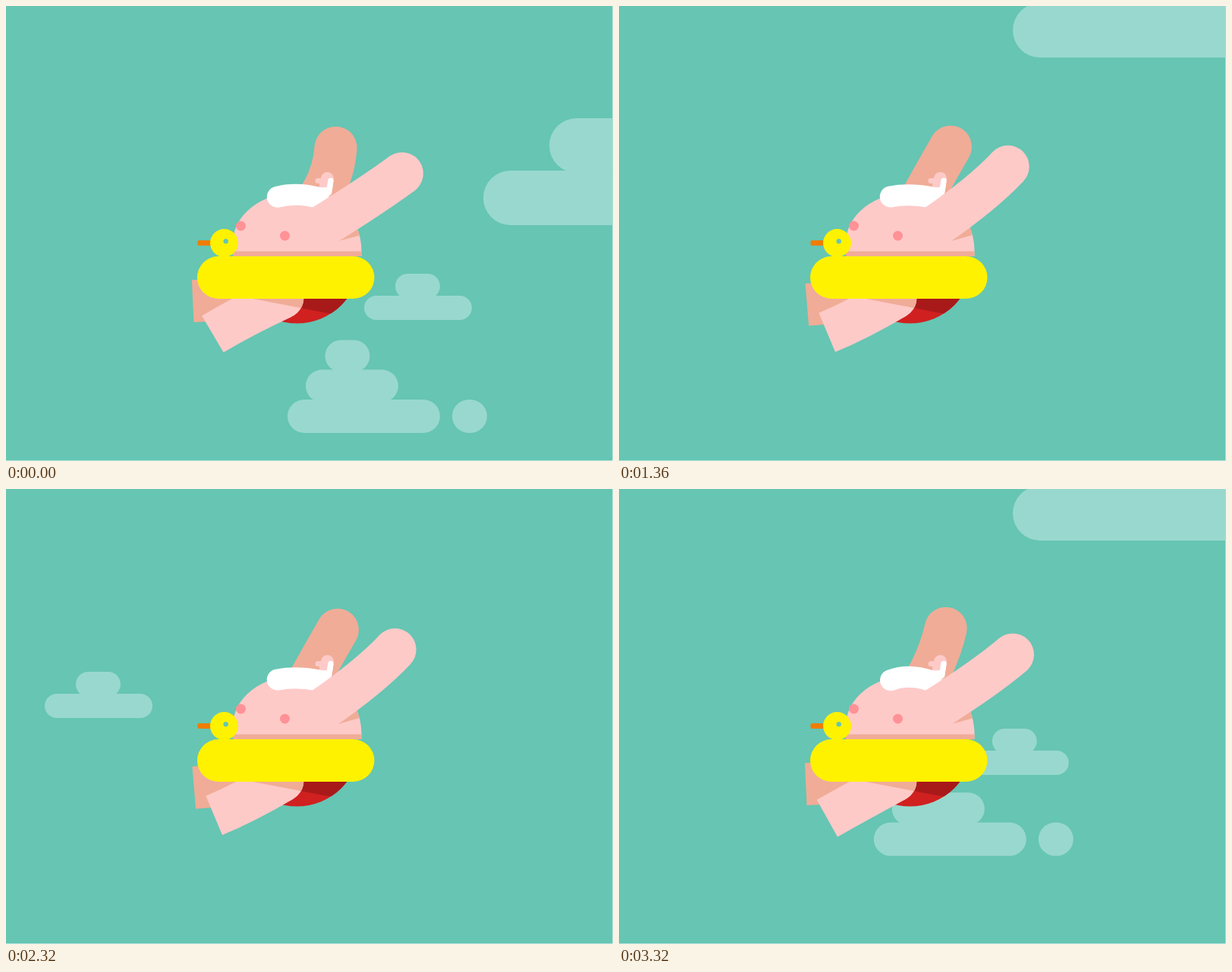
An HTML page with a canvas for the animation above (3360 ms loop, 800 px wide and 600 px high).

```html
<!DOCTYPE html>
<html lang="en">
<head>
<meta charset="utf-8">
<title>Flying swimmer</title>
<style>
  html, body { margin: 0; width: 100%; height: 100%; overflow: hidden; background: #fff; }
  canvas { display: block; }
</style>
</head>
<body>
<canvas id="stage" width="800" height="600"></canvas>
<script>
const ctx = document.getElementById('stage').getContext('2d');
const STEP = 40, LOOP = 84, CYCLE = 12, TURN = 2 * Math.PI;
const SKY = '#66c5b3', MIST = '#99d8ce', SKIN = '#fdcac8', SHADE = '#f0ac97',
      RED = '#d02020', DARK_RED = '#a81a1a', YELLOW = '#fff200', PINK = '#ff9296';

// Cloud kinds: speed per step, and pills as x, y, width, height
const SMALL = { vx: 21.2, vy: 37, pills: [[0, 0, 142, 32], [41, -29, 59, 33]] };
const DOTTED = { vx: 35.2, vy: 79.2,
  pills: [[0, 0, 201, 44], [24, -39.5, 122, 43], [49.5, -78.5, 59, 42], [217, 0, 46, 44]] };
const STACK = { vx: 52, vy: 106, pills: [[0, 0, 232, 50], [45, -48, 142, 50], [61, 48, 142, 48]] };
const BIG = { vx: 110, vy: 221, pills: [[0, 0, 317, 72], [87, -69, 131, 72]] };

function pill(x, y, w, h, color, r = Math.min(w, h) / 2) {
  ctx.fillStyle = color;
  ctx.beginPath();
  ctx.roundRect(x, y, w, h, r);
  ctx.fill();
}

function disc(x, y, r, color) {
  ctx.fillStyle = color;
  ctx.beginPath();
  ctx.arc(x, y, r, 0, TURN);
  ctx.fill();
}

function poly(points, color) {
  ctx.fillStyle = color;
  ctx.beginPath();
  points.forEach(p => ctx.lineTo(...p));
  ctx.fill();
}

function curve(x, y, [ex, ey, bx, by], width, color, cap = 'butt') {
  ctx.strokeStyle = color;
  ctx.lineWidth = width;
  ctx.lineCap = cap;
  ctx.beginPath();
  ctx.moveTo(x, y);
  ctx.quadraticCurveTo(bx, by, ex, ey);
  ctx.stroke();
}

function inside(path, paint) {
  ctx.save();
  ctx.clip(path);
  paint();
  ctx.restore();
}

// Periodic swing: a main beat and an optional second one at double speed
function swing(a, mean, cos, sin, cos2 = 0, sin2 = 0) {
  return mean + cos * Math.cos(a) + sin * Math.sin(a)
    + cos2 * Math.cos(2 * a) + sin2 * Math.sin(2 * a);
}

// Poses: end x, end y, bend x, bend y
const armPose = a => [
  swing(a, 497.3, 24.7, -7.5, 0, 4), swing(a, 201.6, 17, -5.3, 2.3, 2),
  swing(a, 469.5, 7, -14.2, 5.9, 3.8), swing(a, 244.6, 1.4, -7.4, 4, 2.4)
];
const legPose = a => [
  swing(a, 266.7, 5.7, -5.4), swing(a, 414.5, 18.1, -8),
  swing(a, 313.6, 1.2, -1.8), swing(a, 404.8, 2.7, -8.1)
];

// The cloud's main pill is at x, y when step equals start
function cloud(step, kind, start, x, y, scale = 1) {
  const d = (step - start + LOOP * 1.5) % LOOP - LOOP / 2, travel = d * scale ** 1.5;
  for (const [px, py, w, h] of kind.pills)
    pill(x + kind.vx * travel + px * scale, y + kind.vy * travel + py * scale,
         w * scale, h * scale, MIST);
}

function clouds(step) {
  cloud(step, SMALL, 0, 472, 382);
  cloud(step, SMALL, 14, 157, 419);
  cloud(step, SMALL, 58, 51, 270);
  cloud(step, DOTTED, 0, 371, 519);
  cloud(step, DOTTED, 14, 135, -39.5, 0.93);
  cloud(step, STACK, 24, 322, 460);
  cloud(step, STACK, 69, 504, 294, 0.835);
  for (const start of [0, 35, 49, 63]) cloud(step, BIG, start, 629, 217);
}

function arm(pose, dx, color) {
  ctx.save();
  ctx.translate(dx, 0);
  curve(415.5, 291.5, pose, 56, color);
  disc(pose[0], pose[1], 28, color);
  ctx.restore();
}

function backLeg(a) {
  const drop = 13 - 13 * Math.cos(a + TURN / 24) - 1.5 * Math.cos(2 * a + TURN / 12);
  ctx.save();
  ctx.translate(246.5 + 0.34 * drop, 390 + drop);
  ctx.rotate(-(3 + 0.46 * drop) * TURN / 360);
  ctx.fillStyle = SHADE;
  ctx.fillRect(0, -28, 110, 56);
  ctx.restore();
}

function head() {
  disc(423.5, 227.5, 8.5, SKIN);
  pill(407.5, 227, 14, 7, SKIN);
  poly([[413, 230], [430, 230], [430, 242], [413, 242]], SKIN);
}

function body(reach) {
  const hips = new Path2D(), torso = new Path2D();
  hips.arc(383.5, 335.5, 83, 0, TURN / 2);
  torso.moveTo(299, 330);
  torso.ellipse(384, 312, 85, 66, 0, TURN / 2, TURN * 3 / 4);
  torso.arc(384, 323, 84.5, -TURN / 4, 0);
  torso.lineTo(468.5, 330);

  ctx.fillStyle = RED;
  ctx.fill(hips);
  inside(hips, () => poly([[325, 386], [432, 406.4], [470, 386]], DARK_RED));

  ctx.fillStyle = SKIN;
  ctx.fill(torso);
  inside(torso, () => {
    poly([[290, 323.5], [480, 323.5], [480, 332], [290, 332]], SHADE);
    const lift = (523 - reach) / 11.4;
    poly([[434, 311], [470, 301.5 - lift], [470, 265], [425, 290]], SHADE);
  });
  disc(309.5, 290, 6.5, PINK);
  disc(367.5, 303, 6.5, PINK);
}

function beard(a) {
  const sag = swing(a, 0.42, 0, 0, -0.28, 0.36);
  const left = 252 - 2 * sag, right = 253 - 3 * sag, middle = 248 + 5.3 * sag;
  curve(358 - sag, left, [411, right, 382, 2 * middle - (left + right) / 2], 28, '#fff', 'round');
  poly([[405, 240], [423, 239], [431, 235], [429, 248], [403, 265]], '#fff');
  curve(428, 230.5, [425.5, 244, 427, 238], 7.5, '#fff', 'round');
}

function frontLeg(pose) {
  disc(364.5, 384.5, 28, SKIN);
  curve(364.5, 384.5, pose, 56, SKIN);
  poly([[325, 386], [389, 398.2], [391.5, 392], [392.5, 384]], SHADE);
}

function duckRing() {
  pill(252, 330, 233.5, 56, YELLOW);
  pill(252.5, 309, 22, 7, '#ef7d00', 2);
  disc(287.5, 312.5, 18.5, YELLOW);
  disc(289.7, 310.3, 3.2, SKY);
}

function draw(now) {
  // Motion advances at 25 poses per second
  const step = Math.floor(now / STEP) % LOOP, a = step / CYCLE * TURN;
  const pose = armPose(a);
  ctx.clearRect(0, 0, 800, 600);
  ctx.save();
  ctx.beginPath();
  ctx.rect(0, 0, 799.5, 599.5);
  ctx.clip();
  ctx.fillStyle = SKY;
  ctx.fillRect(0, 0, 800, 600);
  clouds(step);
  arm(armPose(a + TURN / 2), -38, SHADE);
  backLeg(a);
  head();
  body(pose[0]);
  beard(a);
  arm(pose, 0, SKIN);
  frontLeg(legPose(a));
  duckRing();
  ctx.restore();
}

function tick() {
  draw(performance.now());
  requestAnimationFrame(tick);
}
tick();
</script>
</body>
</html>
```
